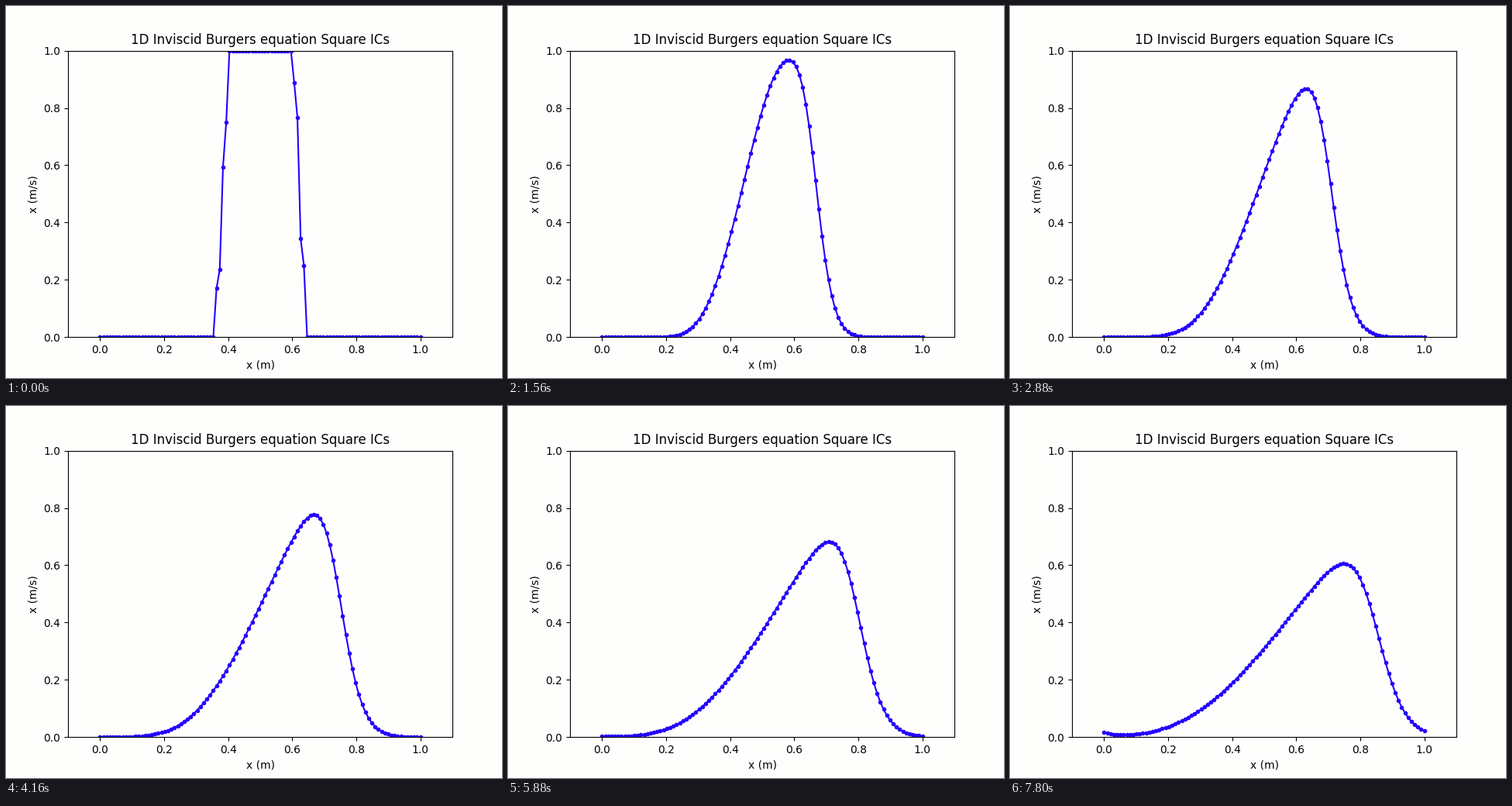
Recreate the animation shown at these times as a matplotlib script. Size 640x480 px, loop 7.84 s.

```python
import matplotlib.pyplot as plt
import numpy as np
from matplotlib.animation import FuncAnimation

FRAMES = 196
INTERVAL = 40   # ms
POINTS = 100
COURANT = 0.25  # dt / dx
WARMUP = 2      # steps taken before the first picture
PAPER = "#fefffd"
BLUE = "#2400ff"


def step(u):
    """Neighbour average with a forward flux difference, periodic ends."""
    ahead, behind = np.roll(u, -1), np.roll(u, 1)
    return (ahead + behind) / 2 - COURANT * (ahead**2 - u**2) / 2


def solve(u, count):
    states = [u]
    for _ in range(count - 1):
        states.append(step(states[-1]))
    return states


x = np.linspace(0, 1, POINTS)
square = np.where((x > 0.38) & (x < 0.62), 1.0, 0.0)
states = solve(square, FRAMES + WARMUP)[WARMUP:]

plt.rcParams["font.family"] = "DejaVu Sans"
fig, ax = plt.subplots(figsize=(6.4, 4.8), dpi=100, facecolor=PAPER)
ax.set_facecolor(PAPER)
ax.set(xlim=(-0.1, 1.1), ylim=(0, 1), xlabel="x (m)", ylabel="x (m/s)",
       title="1D Inviscid Burgers equation Square ICs")
line, = ax.plot(x, states[0], ".-", color=BLUE)


def update(i):
    line.set_ydata(states[i])
    return line,


anim = FuncAnimation(fig, update, frames=FRAMES, interval=INTERVAL,
                     repeat=True, repeat_delay=0)
plt.show()
```
